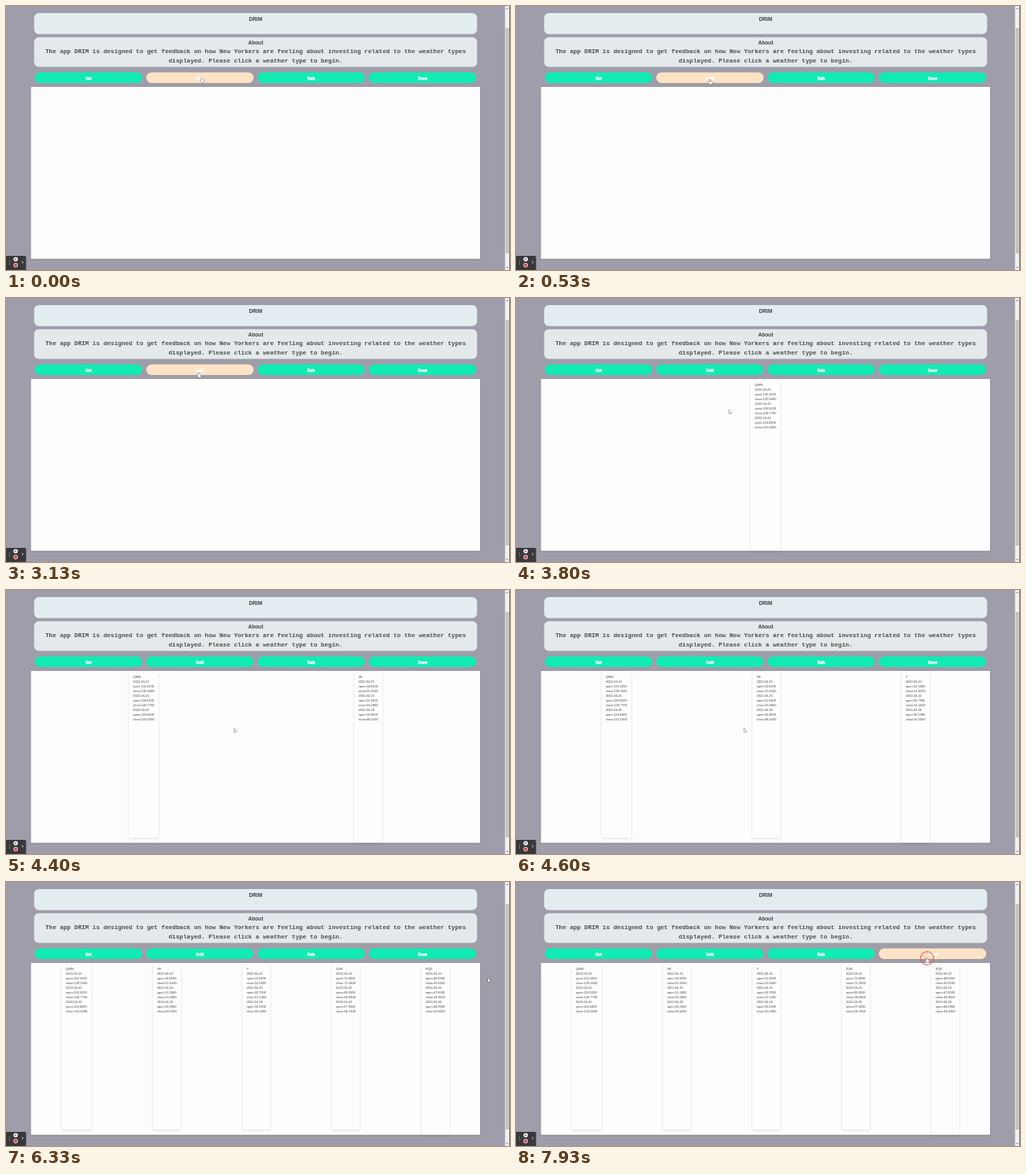
Animation, 640 px wide and 336 px high, one loop 8000 ms. Source, as an HTML page with a canvas:

```html
<!DOCTYPE html>
<html lang="en">
<head>
<meta charset="utf-8">
<title>Weather investing</title>
<style>
html, body { margin: 0; width: 100%; height: 100%; overflow: hidden; background: #9f9da9; }
canvas { display: block; width: 640px; height: 336px; }
</style>
</head>
<body>
<canvas id="stage" width="640" height="336"></canvas>
<script>
const ctx = document.getElementById('stage').getContext('2d');
const LOOP = 8000;
const SANS = '"Liberation Sans", Arial, sans-serif';
const MONO = '"Liberation Mono", "Courier New", monospace';

const PANEL = { x: 31.7, y: 103, w: 570.3, h: 218.7 };
const BUTTONS = ['Hot', 'Cold', 'Rain', 'Snow'].map((label, i) =>
  ({ label, x: 36.8 + i * 141.33, y: 84.6, w: 136.3, h: 13.5 }));

const DATES = ['2022-04-21', '2022-04-25', '2022-04-26'];
// Symbol, then open and close for each date.
const STOCKS = [
  'QWN 132.2200 130.5600 126.0100 128.7700 124.6400 123.0200',
  'XK 54.8100 55.0100 51.3400 50.2800 50.2600 48.4100',
  'Y 53.5400 52.6300 50.7900 51.1300 50.5300 50.2300',
  'ZUB 73.0000 71.5800 68.6500 69.0800 67.9200 66.7200',
  'KQD 48.8300 49.1100 47.8500 48.9500 48.9900 49.0300'
].map((row, i) => {
  const [symbol, ...prices] = row.split(' ');
  const days = DATES.flatMap((date, d) =>
    [date, 'open:' + prices[2 * d], 'close:' + prices[2 * d + 1]]);
  return { at: 3750 + i * 330, lines: [symbol, ...days] };
});
const CARD_FONT = '4px ' + SANS;
const CARD_PAD = 5.33;

const START = { x: 248, y: 91 };
const MOVES = [
  { from: 60, to: 860, x: 244, y: 95 },
  { from: 3300, to: 4200, x: 289.5, y: 176 },
  { from: 5400, to: 6300, x: 612, y: 122.5 },
  { from: 6500, to: 7150, x: 521, y: 96.5 }
];
const CLICKS = [1400, 7850];
const CLICK_TIME = 260;

function pointerAt(t) {
  let { x, y } = START;
  for (const m of MOVES) {
    const k = Math.min(1, Math.max(0, (t - m.from) / (m.to - m.from)));
    const e = k * k * (3 - 2 * k);
    x += (m.x - x) * e;
    y += (m.y - y) * e;
  }
  return { x, y };
}

function inside(b, p) {
  return p.x >= b.x && p.x <= b.x + b.w && p.y >= b.y && p.y <= b.y + b.h;
}

function box(x, y, w, h, r, fill) {
  ctx.fillStyle = fill;
  ctx.beginPath();
  ctx.roundRect(x, y, w, h, r);
  ctx.fill();
}

function raisedBox(x, y, w, h, alpha) {
  ctx.save();
  ctx.shadowColor = `rgba(0,0,0,${alpha})`;
  ctx.shadowBlur = 2.5;
  ctx.shadowOffsetY = 0.8;
  box(x, y, w, h, 0.7, '#fdfdfd');
  ctx.restore();
}

function disc(x, y, r, fill) {
  ctx.fillStyle = fill;
  ctx.beginPath();
  ctx.arc(x, y, r, 0, Math.PI * 2);
  ctx.fill();
}

function text(str, x, y, font, color, align = 'center') {
  ctx.font = font;
  ctx.fillStyle = color;
  ctx.textAlign = align;
  ctx.fillText(str, x, y);
}

function drawHeader() {
  box(35.7, 9, 562.5, 26.7, 6, '#e3edf0');
  box(35.7, 39.8, 562.5, 37.8, 6, '#e4eaeb');
  const title = 'bold 6.67px ' + SANS;
  const body = 'bold 7.68px ' + MONO;
  text('DRIM', 317, 18.6, title, '#3c4043');
  text('About', 317, 49, title, '#3c4043');
  text('The app DRIM is designed to get feedback on how New Yorkers are feeling about investing related to the weather types', 317, 60, body, '#4a4d4f');
  text('displayed. Please click a weather type to begin.', 317, 71.6, body, '#4a4d4f');
}

function drawButtons(pointer) {
  ctx.strokeStyle = '#fff';
  ctx.lineWidth = 0.35;
  for (const b of BUTTONS) {
    const center = b.x + b.w / 2;
    box(b.x, b.y, b.w, b.h, b.h / 2, inside(b, pointer) ? '#fde3c5' : '#10ecb3');
    text(b.label, center, 93.6, 'bold 4.44px ' + SANS, '#fff');
    ctx.strokeText(b.label, center, 93.6);
  }
}

function cardWidth(card) {
  ctx.font = CARD_FONT;
  return Math.max(...card.lines.map(s => ctx.measureText(s).width)) + 2 * CARD_PAD;
}

function drawPanel(t) {
  raisedBox(PANEL.x, PANEL.y, PANEL.w, PANEL.h, 0.16);

  // Cards share the free space evenly, so each arrival shifts the rest.
  const cards = STOCKS.filter(s => t >= s.at);
  const used = cards.reduce((sum, c) => sum + cardWidth(c), 0);
  const gap = (PANEL.w - used) / cards.length;
  let x = PANEL.x + gap / 2;
  cards.forEach((card, i) => {
    const w = cardWidth(card);
    raisedBox(x, 104.5, w, i === cards.length - 1 ? 217 : 211, 0.16);
    card.lines.forEach((line, row) =>
      text(line, x + CARD_PAD, 112.4 + row * 6, CARD_FONT, '#3f4245', 'left'));
    x += w + gap;
  });
}

function triangle(x, y, size) {
  ctx.fillStyle = '#505050';
  ctx.beginPath();
  ctx.moveTo(x - 1.2, y + size);
  ctx.lineTo(x, y - size);
  ctx.lineTo(x + 1.2, y + size);
  ctx.fill();
}

function drawScrollbar() {
  box(633.7, 0, 6.3, 336, 0, '#f1f1f1');
  box(634.6, 28, 4, 287, 0, '#c1c1c1');
  box(639.2, 0, 0.8, 336, 0, '#55545c');
  triangle(636.6, 3, 0.8);
  triangle(636.6, 333, -0.8);
}

function drawRecorder() {
  box(0, 318, 25.5, 18, [0, 1.5, 0, 0], '#38383b');
  for (let i = 0; i < 3; i++) disc(4.5, 324.3 + i * 2, 0.5, '#b5b5b8');
  disc(12.3, 322.3, 2.8, '#f4f4f4');
  for (const x of [11.3, 12.6]) box(x, 321.2, 0.7, 2.2, 0, '#444');
  disc(12.3, 329.8, 2.8, '#f4e4e4');
  disc(12.3, 329.8, 2, '#d93a42');
  ctx.strokeStyle = '#e4e4e4';
  ctx.lineWidth = 0.8;
  ctx.beginPath();
  ctx.moveTo(20.4, 324.4);
  ctx.lineTo(21.9, 326.1);
  ctx.lineTo(20.4, 327.8);
  ctx.stroke();
}

function drawClick(t, p) {
  for (const start of CLICKS) {
    const k = (t - start) / CLICK_TIME;
    if (k < 0 || k > 1) continue;
    ctx.globalAlpha = Math.min(1, 2 - 2 * k);
    disc(p.x + 1, p.y + 0.6, 7.5 + 3 * k, 'rgba(235,90,70,.08)');
    ctx.strokeStyle = 'rgba(226,76,66,.75)';
    ctx.lineWidth = 1.2;
    ctx.stroke();
    ctx.globalAlpha = 1;
  }
}

const ARROW = new Path2D('M0 0V4.7L1.1 3.8 1.8 5.4 2.6 5 1.9 3.5 3.3 3.4Z');
const HAND = new Path2D('M0 0H.9L1.1 2.1 3.3 2.6 3.5 4.4 2.9 6H.5L-1.3 3.6-.8 3.1 0 3.7Z');

function drawPointer(p) {
  const shape = BUTTONS.some(b => inside(b, p)) ? HAND : ARROW;
  ctx.save();
  ctx.translate(p.x, p.y);
  ctx.lineWidth = 0.8;
  ctx.lineJoin = 'round';
  ctx.strokeStyle = '#4c4c4c';
  ctx.fillStyle = '#fff';
  ctx.stroke(shape);
  ctx.fill(shape);
  ctx.restore();
}

function draw(t) {
  const pointer = pointerAt(t);
  box(0, 0, 640, 336, 0, '#9f9da9');
  drawHeader();
  drawButtons(pointer);
  drawPanel(t);
  drawScrollbar();
  drawRecorder();
  drawClick(t, pointer);
  drawPointer(pointer);
}

const begin = performance.now();
function tick() {
  draw((performance.now() - begin) % LOOP);
  requestAnimationFrame(tick);
}
tick();
</script>
</body>
</html>
```
